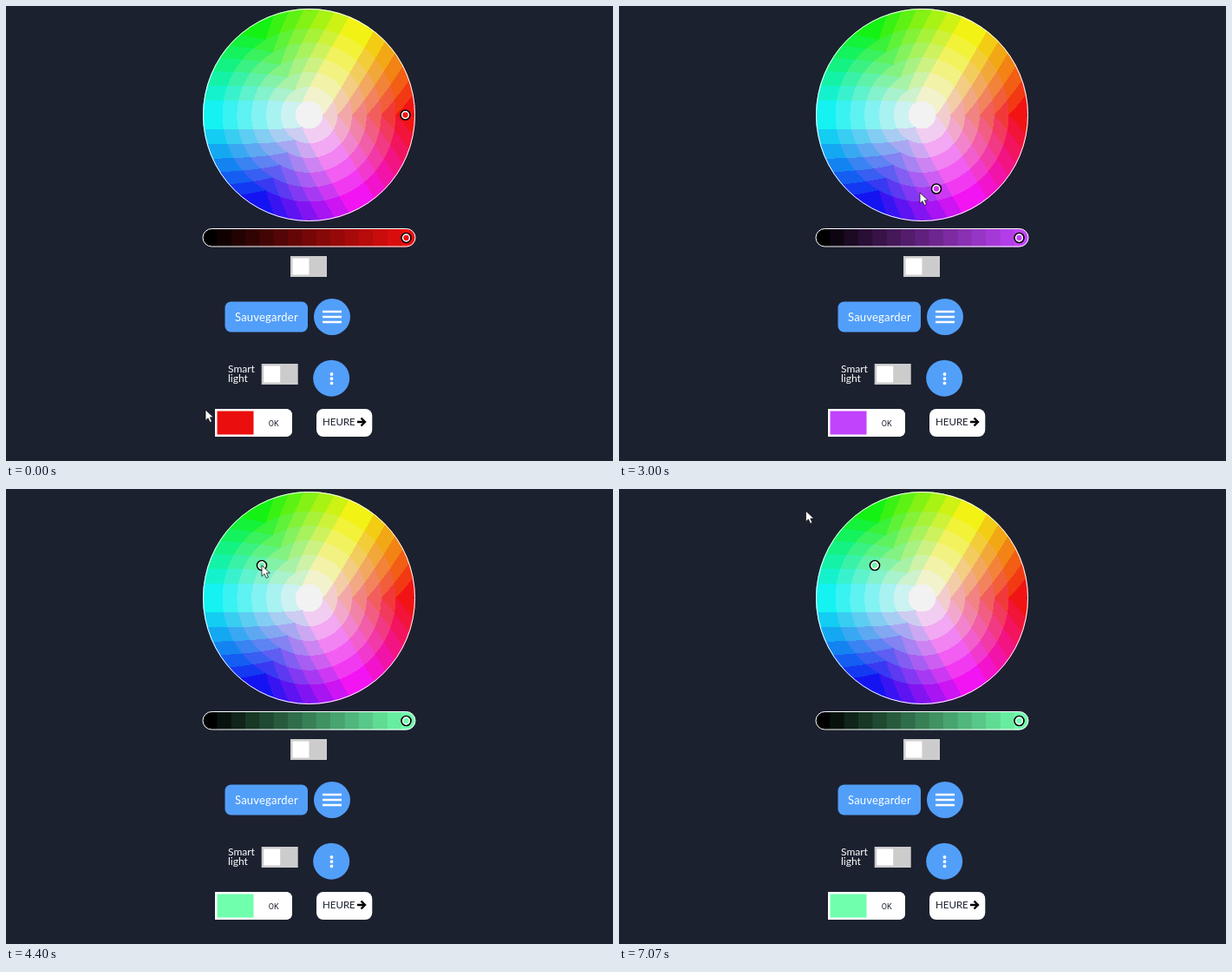
An HTML page with a canvas for the animation above (7.19 s loop, 700 by 524 pixels).

```html
<!DOCTYPE html>
<html lang="fr">
<head>
<meta charset="utf-8">
<style>
  html, body { margin: 0; width: 100%; height: 100%; overflow: hidden; background: #1c2130; }
  canvas, svg { position: absolute; left: 0; top: 0; }
  #wheel { left: 227px; top: 3px; border-radius: 50%; }
  text { font-family: Lato, sans-serif; fill: #fff; }
  .dark { fill: #1c2130; }
  .blue { fill: #529ffa; }
</style>
</head>
<body>
<canvas id="wheel" width="245" height="245"></canvas>
<svg width="700" height="524" viewBox="0 0 700 524">
  <defs>
    <clipPath id="pill"><rect x="227" y="256.5" width="245" height="21" rx="10.5"/></clipPath>
    <g id="handle" fill="none">
      <circle r="5.4" stroke="#000" stroke-width="1.8"/>
      <circle r="3.9" stroke="#fff" stroke-width="1.5"/>
    </g>
    <g id="toggle">
      <path d="M0 0h42v24H0z" fill="#ccc"/>
      <path d="M2.5 2.5h19v19h-19z" fill="#fff"/>
    </g>
  </defs>

  <circle cx="349.5" cy="125.5" r="122" fill="none" stroke="#fff"/>
  <g id="slider" clip-path="url(#pill)"></g>
  <rect x="227" y="256.5" width="245" height="20.5" rx="10.25" fill="none" stroke="#fff"/>
  <use href="#handle" x="461.5" y="267"/>
  <use href="#handle" id="picker"/>

  <use href="#toggle" x="328" y="288"/>
  <use href="#toggle" x="294.7" y="412"/>

  <rect class="blue" x="252.5" y="340.5" width="95.5" height="35" rx="7"/>
  <text x="264" y="362.5" font-size="13" letter-spacing=".2">Sauvegarder</text>
  <circle class="blue" cx="376" cy="358" r="21"/>
  <path d="M365 352h22M365 358h22M365 364h22" stroke="#fff" stroke-width="2.4"/>

  <text font-size="12"><tspan x="256" y="422">Smart</tspan><tspan x="256" y="433">light</tspan></text>
  <circle class="blue" cx="375.2" cy="428.7" r="21"/>
  <path d="M375.5 424v0M375.5 429.2v0M375.5 434.4v0" stroke="#fff" stroke-width="3.8" stroke-linecap="round"/>

  <path d="M241 464h81q8 0 8 8v16q0 8-8 8h-81z" fill="#fff"/>
  <path id="ok" d="M288 464h34q8 0 8 8v16q0 8-8 8h-34z"/>
  <path id="swatch" d="M243.5 466.5h42v27h-42z"/>
  <text class="dark" x="302.8" y="483.5" font-size="9" style="font-family:Roboto,sans-serif">OK</text>

  <rect x="358" y="464" width="64.3" height="32" rx="8" fill="#fff"/>
  <text class="dark" x="365" y="483.2" font-size="11.5">HEURE</text>
  <path d="M405 479h8M409.5 474.5l4.5 4.5l-4.5 4.5" fill="none" stroke="#000" stroke-width="2.4"/>

  <path id="cursor" d="M0 0v12.5l3-2.8l2.2 4.8l2.3-1l-2.1-4.7h4z" fill="#fff" stroke="#111" stroke-width=".8"/>
</svg>
<script>
const $ = id => document.getElementById(id);
const CX = 349.5, CY = 125.5, SIZE = 245, REACH = 111, RADIUS = 118;
const LOOP = 7190, STEP = 200 / 3, LAST = 106;
const BANDS = 15, GRAB = 2470, LAG = 63, RELEASE = 4400;

// Stops of the pointer tip: time, x, y
const stops = [
  [0, 230, 465], [800, 230, 468], [1267, 290, 446],
  [2330, 460, 126], [2404, 460, 126], [2470, 458.5, 129],
  [2533, 447, 150], [2937, 366, 210.5], [3000, 347, 215],
  [3604, 260.5, 142.5], [3667, 262, 128], [4330, 295, 88],
  [4660, 295, 88], [5400, 306, 478], [5870, 306, 478],
  [6500, 176, 210], [LOOP, 224, -15]
];

function pointer(t) {
  const i = Math.max(1, stops.findIndex(s => s[0] >= t));
  const [t0, x0, y0] = stops[i - 1], [t1, x1, y1] = stops[i];
  const f = (t - t0) / (t1 - t0);
  return [x0 + (x1 - x0) * f, y0 + (y1 - y0) * f];
}

// Hue is the angle from the centre, saturation the distance
function wheelColor(dx, dy, radius, value = 1) {
  const hue = (Math.atan2(-dy, dx) * 3 / Math.PI + 6) % 6;
  const sat = Math.min(1, Math.hypot(dx, dy) / radius);
  return [5, 3, 1].map(n => {
    const k = (n + hue) % 6;
    return 255 * value * (1 - sat * Math.max(0, Math.min(k, 4 - k, 1)));
  });
}

// Seven levels per channel give the stepped rings
const posterize = c => 20 + 37 * Math.max(0, Math.min(6, Math.floor((c - 12) / 35)));

function paintWheel() {
  const ctx = $('wheel').getContext('2d');
  const img = ctx.createImageData(SIZE, SIZE);
  for (let i = 0; i < SIZE * SIZE; i++) {
    const rgb = wheelColor(i % SIZE - 122, Math.floor(i / SIZE) - 122, SIZE / 2);
    img.data.set([...rgb.map(posterize), 255], i * 4);
  }
  ctx.putImageData(img, 0, 0);
}

const bands = Array.from({ length: BANDS }, (_, i) => {
  const band = document.createElementNS('http://www.w3.org/2000/svg', 'rect');
  const w = SIZE / BANDS;
  Object.entries({ x: 227 + i * w, y: 256, width: w + .5, height: 22 })
    .forEach(([k, v]) => band.setAttribute(k, v));
  return $('slider').appendChild(band);
});

const place = (id, x, y) => $(id).setAttribute('transform', `translate(${x} ${y})`);
const rgb = (c, m = 1) => `rgb(${c.map(v => Math.round(v * m))})`;

function draw(now) {
  const t = Math.min(LAST, Math.floor((now % LOOP + 4) / STEP)) * STEP;
  const [x, y] = pointer(t);
  place('cursor', x, y);

  let dx = REACH, dy = 0;
  if (t >= GRAB) {
    const [px, py] = pointer(Math.min(t, RELEASE) - LAG);
    const pull = Math.min(1, REACH / Math.hypot(px - CX, py - CY));
    dx = (px - CX) * pull;
    dy = (py - CY) * pull;
  }
  place('picker', CX + dx, CY + dy);

  const value = 1 - .08 * Math.max(0, dx / Math.hypot(dx, dy));
  const color = wheelColor(dx, dy, RADIUS, value);
  $('swatch').setAttribute('fill', rgb(color));
  bands.forEach((b, i) => b.setAttribute('fill', rgb(color, i / (BANDS - 1))));

  const hover = x > 288 && x < 330 && y > 464 && y < 496;
  $('ok').setAttribute('fill', hover ? '#d0d0d0' : '#fff');
  requestAnimationFrame(() => draw(performance.now() - start));
}

paintWheel();
const start = performance.now();
draw(0);
</script>
</body>
</html>
```
